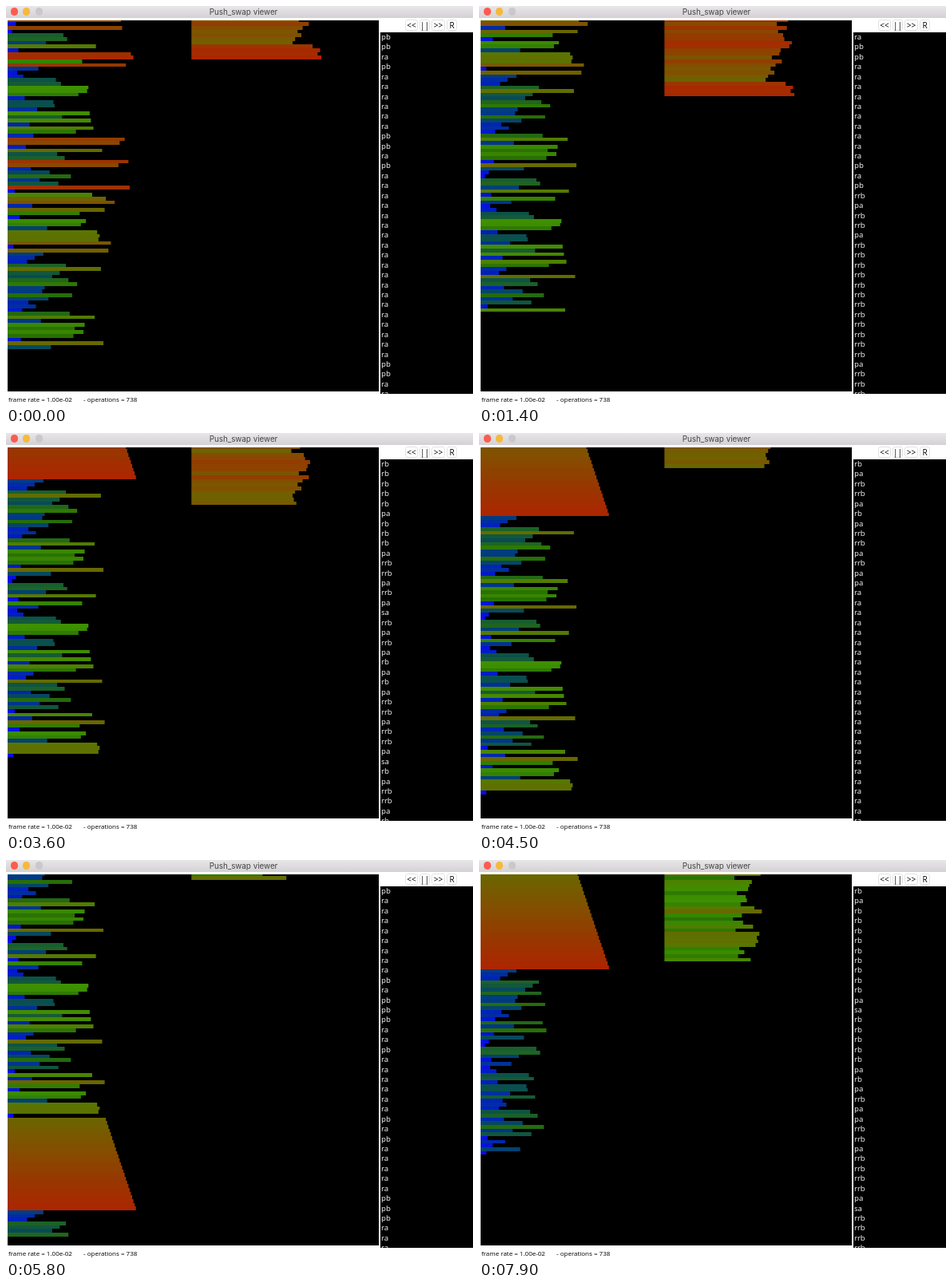
Write an HTML page with a canvas that moves like this. It is 585 px wide and 500 px high and loops after 8000 ms.

```html
<!DOCTYPE html>
<html lang="en">
<head>
<meta charset="utf-8">
<title>Push_swap viewer</title>
<style>
  html, body { margin: 0; width: 100%; height: 100%; overflow: hidden; background: #fff; }
  body { position: relative; color: #000; font-family: "Open Sans", "Noto Sans", sans-serif; }
  body > * { position: absolute; margin: 0; box-sizing: border-box; white-space: pre; }
  header { left: 0; top: 0; width: 585px; height: 15px; background: linear-gradient(#e8e6e8, #d3d1d3);
    font: 9.8px/15px Inter, sans-serif; color: #444; text-align: center; padding-left: 10px; }
  header i { position: absolute; top: 2.3px; width: 9.4px; height: 9.4px; border-radius: 50%; }
  canvas { left: 2px; top: 18px; background: #000; }
  #ops { left: 469px; top: 33px; width: 116px; height: 453px; padding-left: 1px; overflow: hidden;
    background: #000; color: #fff; font: 9.6px/12.42px "Open Sans", "Noto Sans", sans-serif; }
  .button { top: 17px; height: 14px; border: 1px solid #e2e2e2; border-radius: 3px;
    font-size: 10px; line-height: 12px; text-align: center; }
  .status { top: 486px; font-size: 8px; line-height: 13px; }
</style>
</head>
<body>
<header>Push_swap viewer<i style="left:6px;background:#fc5b50"></i><i style="left:21px;background:#f5b93c"></i><i style="left:36.5px;background:#cac8ca"></i></header>
<canvas width="465" height="465"></canvas>
<div class="button" style="left:500px;width:16px">&lt;&lt;</div>
<div class="button" style="left:518px;width:13px">||</div>
<div class="button" style="left:533px;width:17px">&gt;&gt;</div>
<div class="button" style="left:552px;width:13px">R</div>
<pre id="ops"></pre>
<div class="status" style="left:3px">frame rate = 1.00e-02</div>
<div class="status" style="left:97px">- operations = 738</div>
<script>
const ctx = document.querySelector('canvas').getContext('2d');
const opsView = document.getElementById('ops');

const a = `88 4 89 1 42 45 28 68 6 96 98 57 92 22 5 10 36 40 62 61 54 11 34 35 21 63 41 64 15 66
  52 18 91 87 12 73 37 43 94 86 16 31 48 23 38 95 3 65 76 83 17 75 55 7 60 56 29 69 71 70
  80 2 78 26 19 13 44 72 39 33 46 53 27 25 49 30 14 20 9 47 67 24 59 51 58 50 8 74 32`
  .split(/\s+/).map(Number);
const b = [82, 90, 85, 81, 84, 79, 77, 93, 99, 97, 100];

// Sort in chunks, recording every operation and the stacks after it.
const moves = {
  ra: () => a.push(a.shift()),
  rb: () => b.push(b.shift()),
  rrb: () => b.unshift(b.pop()),
  pa: () => a.unshift(b.shift()),
  pb: () => b.unshift(a.shift()),
  sa: () => a.unshift(a.splice(1, 1)[0])
};
const ops = ['pb'], states = [[a.slice(), b.slice()]];

function run(op) {
  moves[op]();
  ops.push(op);
  states.push([a.slice(), b.slice()]);
}

function pushChunk(low, high) {
  const inChunk = v => v > low && v <= high;
  while (a.some(inChunk)) run(inChunk(a[0]) ? 'pb' : 'ra');
  if (high < 100) while (a[0] !== high + 1) run('ra');
}

function pullBack() {
  while (b.length) {
    const n = b.length, half = n >> 1, max = Math.max(...b);
    const first = b.indexOf(max), second = b.indexOf(max - 1);
    const dist = i => i < half ? i : n - i;
    // Fetch the runner-up first when it is clearly nearer; a swap fixes the order later.
    const early = second > 0 && dist(second) * 1.4 < dist(first);
    const goal = early ? second : first;
    if (goal) for (let i = dist(goal); i > 0; i--) run(goal < half ? 'rb' : 'rrb');
    run('pa');
    if (a[1] === a[0] - 1) run('sa');
  }
}

for (const low of [75, 50]) {
  pushChunk(low, low === 75 ? 100 : low + 25);
  pullBack();
}

// Value, red, green, blue
const stops = [
  [1, 8, 8, 238], [12, 0, 32, 190], [20, 0, 46, 160], [28, 2, 64, 118], [35, 10, 80, 76],
  [45, 30, 100, 34], [50, 40, 112, 2], [62, 62, 144, 0], [70, 92, 114, 0], [76, 108, 100, 0],
  [85, 134, 76, 0], [92, 150, 56, 0], [100, 172, 38, 0]
];
// Tick, operations done
const pace = [[0, 0], [14, 48], [26, 90], [45, 156], [58, 202], [69, 240], [79, 276]];

function lerpTable(table, x) {
  const i = Math.max(1, table.findIndex(row => row[0] >= x));
  const p = table[i - 1], q = table[i], f = (x - p[0]) / (q[0] - p[0]);
  return p.slice(1).map((v, j) => Math.round(v + (q[j + 1] - v) * f));
}

function drawStack(stack, x) {
  const edge = i => Math.round(15.8 + 4.65 * i) - 18;
  stack.forEach((v, i) => {
    ctx.fillStyle = `rgb(${lerpTable(stops, v)})`;
    ctx.fillRect(x, edge(i), 7.75 + 155 * (v - 1) / 99, edge(i + 1) - edge(i));
  });
}

let shown = -1;
function draw(now) {
  const tick = Math.floor(now % 8000 / 100);
  if (tick !== shown) {
    shown = tick;
    const [done] = lerpTable(pace, tick);
    ctx.clearRect(0, 0, 465, 465);
    drawStack(states[done][0], -2);
    drawStack(states[done][1], 230.3);
    opsView.textContent = ops.slice(done, done + 37).join('\n');
  }
  requestAnimationFrame(draw);
}
draw(performance.now());
</script>
</body>
</html>
```
